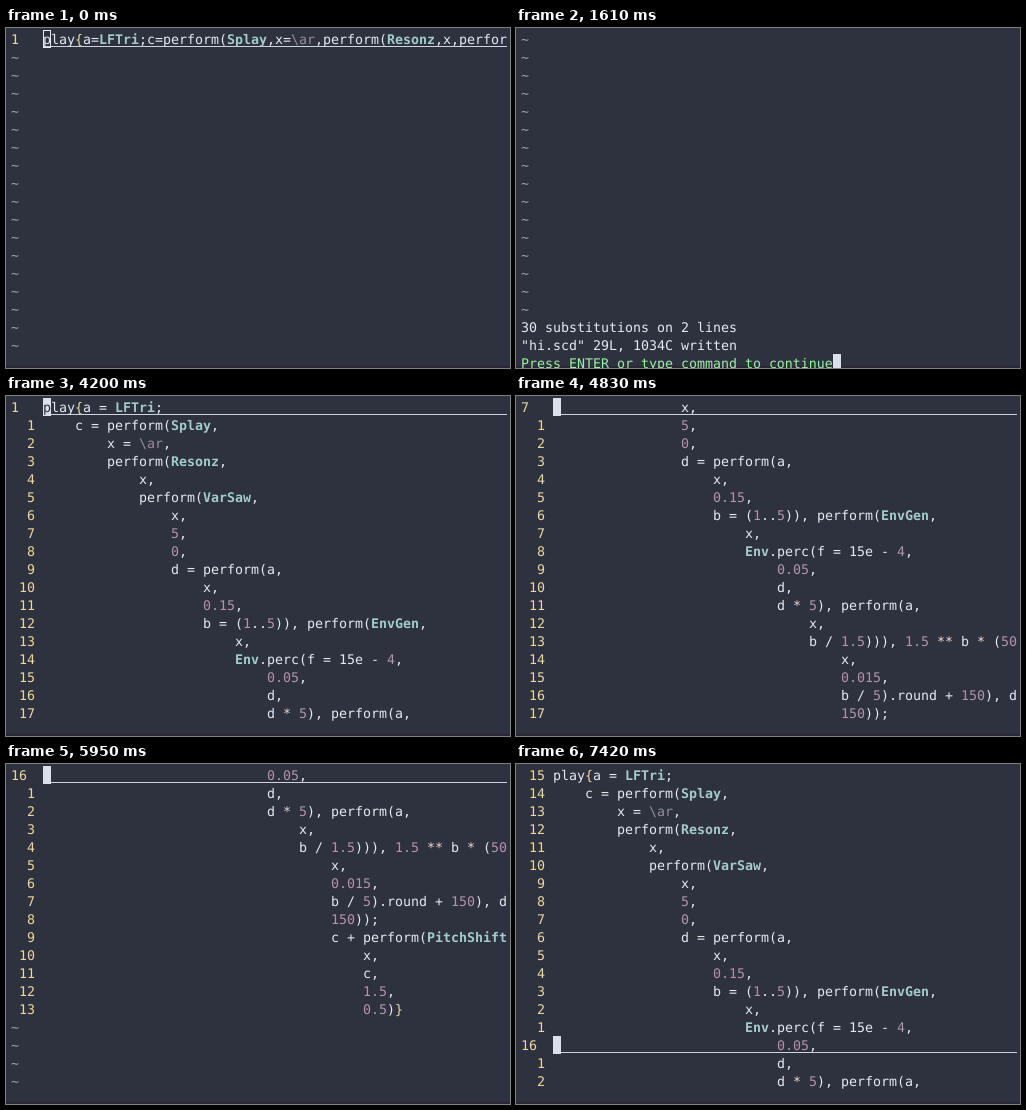
Animation of 504 by 340 pixels, one loop 8330 ms. Source, as an HTML page:

```html
<!DOCTYPE html>
<html lang="en">
<head>
<meta charset="utf-8">
<title>Formatting code on save</title>
<style>
  html, body { margin: 0; width: 100%; height: 100%; overflow: hidden; background: #2e323e; }
  svg { display: block; width: 504px; height: 340px; }
  text {
    font: 13.29px "DejaVu Sans Mono", monospace;
    white-space: pre;
    text-rendering: geometricPrecision;
    fill: #e4e8ef;
  }
  .class { fill: #a3cbc9; font-weight: bold; }
  .num { fill: #b294aa; }
  .sym { fill: #988b9d; }
  .brace { fill: #ead7a0; }
  .op { fill: #ecd6d4; }
  .line { fill: #ebd89c; }
  .tilde { fill: #9aa1ae; }
  .prompt { fill: #9cf0a2; }
  .dark { fill: #2e323e; }
</style>
</head>
<body>
<svg viewBox="0 0 504 340">
  <rect width="504" height="340" fill="#2e323e"/>
  <rect y="338" width="504" height="2" fill="#292736"/>
  <g id="screen"></g>
</svg>
<script>
const LOOP = 8330, TICK = 70;
const COL = 8, ROW = 18, LEFT = 5, TEXT_COL = 4, COLS = 62, ROWS = 18;

const packed = ["play{a=LFTri;c=perform(Splay,x=\\ar,perform(Resonz,x,perfor"];

// Leading digit groups give the indent level, in steps of four columns.
const formatted = [
  [0, "play{a = LFTri;"],
  [1, "c = perform(Splay,"],
  [2, "x = \\ar,", "perform(Resonz,"],
  [3, "x,", "perform(VarSaw,"],
  [4, "x,", "5,", "0,", "d = perform(a,"],
  [5, "x,", "0.15,", "b = (1..5)), perform(EnvGen,"],
  [6, "x,", "Env.perc(f = 15e - 4,"],
  [7, "0.05,", "d,", "d * 5), perform(a,"],
  [8, "x,", "b / 1.5))), 1.5 ** b * (50"],
  [9, "x,", "0.015,", "b / 5).round + 150), d", "150));", "c + perform(PitchShift,"],
  [10, "x,", "c,", "1.5,", "0.5)}"]
].flatMap(([level, ...lines]) => lines.map(s => " ".repeat(level * 4) + s));

const TOKEN = /(?<sym>\\\w+)|(?<class>\b[A-Z]\w+)|(?<num>\b\d+(?:\.\d+)?\b)|(?<brace>[{}])|(?<op>\*+)/g;

// Wheel turns move the view three lines at a time.
const WHEEL = 3;
const wheelDown = [4480, 4690, 4900, 5110, 5320];
const wheelUp = [6020, 6160, 6300, 6440, 6650];

const screen = document.getElementById("screen");
const escapeText = s => s.replace(/&/g, "&amp;").replace(/</g, "&lt;");
const colX = col => LEFT + col * COL;

function put(row, col, s, cls = "") {
  return `<text x="${colX(col)}" y="${row * ROW + 16}" class="${cls}">${escapeText(s)}</text>`;
}

function block(row, col, hollow) {
  const x = colX(col), y = row * ROW + 2;
  return hollow
    ? `<rect x="${x + .5}" y="${y + .5}" width="7" height="17" fill="none" stroke="#e4e8ef"/>`
    : `<rect x="${x}" y="${y}" width="8" height="18" fill="#dbe0ea"/>`;
}

function codeLine(row, s) {
  s = s.slice(0, COLS - TEXT_COL);
  let out = "", pos = 0;
  const add = (part, at, cls) => {
    const skip = part.length - part.trimStart().length;
    if (part.trim()) out += put(row, TEXT_COL + at + skip, part.trim(), cls);
  };
  for (const m of s.matchAll(TOKEN)) {
    add(s.slice(pos, m.index), pos);
    add(m[0], m.index, Object.keys(m.groups).find(k => m.groups[k]));
    pos = m.index + m[0].length;
  }
  add(s.slice(pos), pos);
  return out;
}

function editor(lines, top, current, cursor) {
  let out = "";
  for (let row = 0; row < ROWS; row++) {
    const n = top + row;
    if (n > lines.length) {
      out += put(row, 0, "~", "tilde");
      continue;
    }
    const label = n === current ? String(n) : String(Math.abs(n - current)).padStart(3);
    const indent = label.length - label.trimStart().length;
    out += put(row, indent, label.trim(), "line");
    if (n === current) {
      out += `<rect x="${colX(TEXT_COL)}" y="${row * ROW + 18}" width="464" height="1" fill="#cdd2dc"/>`;
    }
    out += codeLine(row, lines[n - 1]);
    if (n === current && cursor) {
      out += block(row, TEXT_COL, cursor === "hollow");
      const under = lines[n - 1][0];
      if (cursor === "solid" && under !== " ") out += put(row, TEXT_COL, under, "dark");
    }
  }
  return out;
}

function commandLine(s) {
  return put(ROWS, 0, s) + block(ROWS, s.length);
}

function messages() {
  const prompt = "Press ENTER or type command to continue";
  let out = "";
  for (let row = 0; row < 16; row++) out += put(row, 0, "~", "tilde");
  return out +
    put(16, 0, "30 substitutions on 2 lines") +
    put(17, 0, '"hi.scd" 29L, 1034C written') +
    put(18, 0, prompt, "prompt") +
    block(18, prompt.length);
}

function view(t) {
  if (t < 1120) return editor(packed, 1, 1, t < TICK ? "hollow" : "solid");
  if (t < 1400) return editor(packed, 1, 1) + commandLine(t < 1330 ? ":" : ":w");
  if (t < 2310) return messages();
  const turns = times => WHEEL * times.filter(at => at <= t).length;
  const current = 1 + turns(wheelDown);
  return editor(formatted, current - turns(wheelUp), current, "solid");
}

let shown = "";
function draw(now) {
  const t = Math.floor((now % LOOP) / TICK) * TICK;
  const next = view(t);
  if (next !== shown) screen.innerHTML = shown = next;
}

const start = performance.now();
function loop() {
  draw(performance.now() - start);
  requestAnimationFrame(loop);
}
loop();
</script>
</body>
</html>
```
